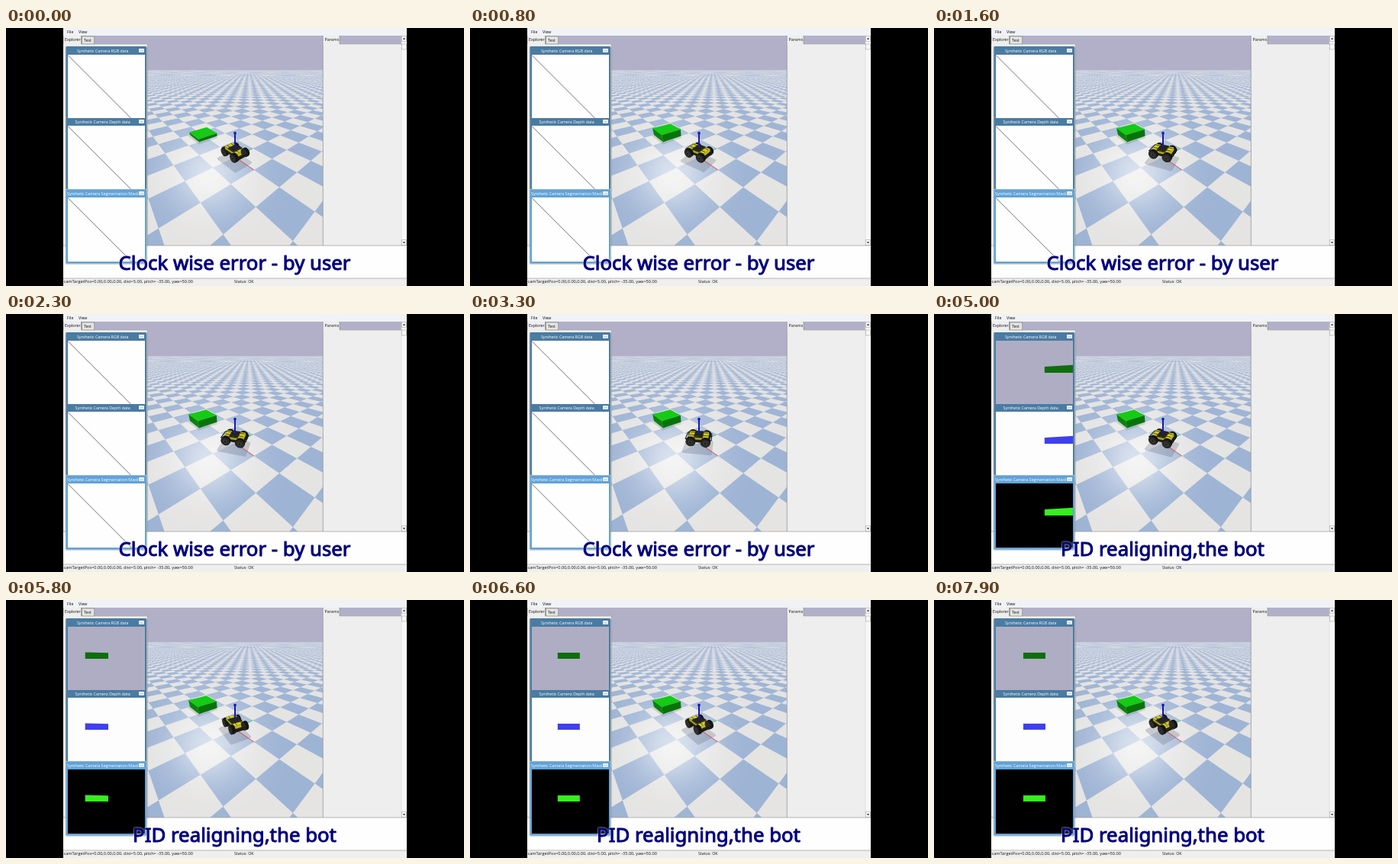
Animation, 600 px wide and 338 px high, one loop 8 s. Source, as an HTML page with a canvas:

```html
<!DOCTYPE html>
<html lang="en">
<head>
<meta charset="utf-8">
<title>Robot alignment simulation</title>
<style>
html, body { margin: 0; width: 100%; height: 100%; overflow: hidden; background: #000; }
canvas, svg { position: absolute; left: 0; top: 0; width: 600px; height: 338px; display: block; }
text { font: 5.3px "Open Sans", sans-serif; fill: #111; white-space: pre; }
.title { fill: #fff; text-anchor: middle; }
.caption { font: 400 25.8px "Noto Sans", sans-serif; fill: #00007c; text-anchor: middle;
  stroke: #00007c; stroke-width: 1px; stroke-linejoin: round; filter: drop-shadow(0 0 .8px #fff); }
</style>
</head>
<body>
<canvas id="floor" width="600" height="338"></canvas>
<svg viewBox="0 0 600 338">
  <g id="scene"></g>
  <g id="chrome"></g>
  <g id="views"></g>
  <text id="caption" class="caption" x="299.5" y="316.5"></text>
</svg>
<script>
const LOOP = 8000, STEP = 100, VIEWS_ON = 3500;
const rad = deg => deg * Math.PI / 180;
const byId = id => document.getElementById(id);

// Orbit camera around the world origin, z up.
const FOCAL = 169, CX = 300, CY = 169, DIST = 5;
const cosP = Math.cos(rad(35)), sinP = Math.sin(rad(35));
const cosY = Math.cos(rad(50)), sinY = Math.sin(rad(50));
const EYE = [sinY * cosP * DIST, -cosY * cosP * DIST, sinP * DIST];

function project([x, y, z]) {
  const right = x * cosY + y * sinY, ahead = y * cosY - x * sinY;
  const depth = DIST + ahead * cosP - z * sinP;
  const up = ahead * sinP + z * cosP;
  return [CX + FOCAL * right / depth, CY - FOCAL * up / depth, depth];
}

// ---------- static checkered floor ----------
const SKY = [178, 176, 200], HAZE = [205, 212, 226], BLUE = [157, 179, 212], WHITE = [229, 228, 227];

function floorColor(px, py) {
  const a = (px - CX) / FOCAL, b = (CY - py) / FOCAL;
  const fall = sinP - b * cosP;
  if (fall <= 0.022) return SKY;
  const t = EYE[2] / fall, ahead = t * (cosP + b * sinP), right = t * a;
  const x = EYE[0] + right * cosY - ahead * sinY;
  const y = EYE[1] + right * sinY + ahead * cosY;
  const base = (Math.floor(x) + Math.floor(y)) & 1 ? BLUE : WHITE;
  const fog = Math.min(1, t / 150);
  const shine = .6 * Math.exp(-((px - 266) ** 2 + (py - 190) ** 2) / 2600);
  return base.map((c, i) => {
    const hazy = c + (HAZE[i] - c) * fog;
    return hazy + (255 - hazy) * shine;
  });
}

function paintFloor() {
  const ctx = byId("floor").getContext("2d");
  const x0 = 185, y0 = 10, w = 230, h = 275, n = 4;
  const img = ctx.createImageData(w, h);
  for (let y = 0, k = 0; y < h; y++) for (let x = 0; x < w; x++, k += 4) {
    const sum = [0, 0, 0];
    for (let s = 0; s < n * n; s++) {
      const c = floorColor(x0 + x + (s % n + .5) / n, y0 + y + ((s / n | 0) + .5) / n);
      for (let i = 0; i < 3; i++) sum[i] += c[i];
    }
    for (let i = 0; i < 3; i++) img.data[k + i] = sum[i] / (n * n);
    img.data[k + 3] = 255;
  }
  ctx.putImageData(img, x0, y0);
}

// ---------- svg helpers ----------
const fix = v => v.toFixed(2);
const poly = (pts, fill, extra = "") =>
  `<polygon points="${pts.map(p => fix(p[0]) + "," + fix(p[1])).join(" ")}" fill="${fill}" ${extra}/>`;
const rect = (x, y, w, h, fill, extra = "") =>
  `<rect x="${x}" y="${y}" width="${w}" height="${h}" fill="${fill}" ${extra}/>`;
const line = (a, b, color, width = .7) =>
  `<line x1="${fix(a[0])}" y1="${fix(a[1])}" x2="${fix(b[0])}" y2="${fix(b[1])}" stroke="${color}" stroke-width="${width}"/>`;
const label = (x, y, s, cls = "", extra = "") => `<text x="${x}" y="${y}" class="${cls}" ${extra}>${s}</text>`;

// Box with its camera-facing sides; colors are [x sides, y sides, top].
function box([x0, x1], [y0, y1], [z0, z1], colors, place = p => p) {
  const faces = [
    [[x1, y0, z0], [x1, y1, z0], [x1, y1, z1], [x1, y0, z1], 0],
    [[x0, y1, z0], [x0, y0, z0], [x0, y0, z1], [x0, y1, z1], 0],
    [[x0, y0, z0], [x1, y0, z0], [x1, y0, z1], [x0, y0, z1], 1],
    [[x1, y1, z0], [x0, y1, z0], [x0, y1, z1], [x1, y1, z1], 1],
    [[x0, y0, z1], [x1, y0, z1], [x1, y1, z1], [x0, y1, z1], 2]
  ];
  return faces.map(f => {
    const p = f.slice(0, 4).map(v => project(place(v)));
    const turn = (p[1][0] - p[0][0]) * (p[2][1] - p[0][1]) - (p[1][1] - p[0][1]) * (p[2][0] - p[0][0]);
    return turn < 0 ? poly(p, colors[f[4]]) : "";
  }).join("");
}

// ---------- motion ----------
const HEADING = [[0, 1], [1600, 27], [3300, 42], [3500, 41], [4300, 38], [5000, 27],
  [6050, -18], [6600, -2], [7100, 0], [7900, 0], [8000, 0]];

function heading(t) {
  const i = Math.max(1, HEADING.findIndex(k => k[0] > t));
  const [t0, a] = HEADING[i - 1], [t1, b] = HEADING[i];
  const u = (t - t0) / (t1 - t0);
  const eased = t >= 5000 ? u * u * (3 - 2 * u) : u;
  return rad(a + (b - a) * eased);
}

// ---------- scene ----------
const AXLE = .23, WHEEL_R = .17;

function wheel(x, y, place) {
  const side = Math.sign(y), disc = (offset, r, fill) => {
    const pts = [];
    for (let i = 0; i < 16; i++) {
      const q = i * Math.PI / 8;
      pts.push(project(place([x + r * Math.cos(q), y + offset, AXLE + r * Math.sin(q)])));
    }
    return poly(pts, fill);
  };
  const depth = project(place([x, y, AXLE]))[2];
  const toEye = project(place([x, y + .1, AXLE]))[2] < depth ? 1 : -1;
  let out = "";
  for (let i = -3; i <= 3; i++) out += disc(toEye * i * .022, WHEEL_R, i < 3 ? "#161616" : "#282826");
  if (toEye === side) out += disc(toEye * .068, .085, "#3c3c38") + disc(toEye * .07, .04, "#181818");
  return { depth, out };
}

function robot(angle) {
  const c = Math.cos(angle), s = Math.sin(angle);
  const place = ([x, y, z]) => [x * c - y * s, x * s + y * c, z];
  const at = (x, y, z) => project(place([x, y, z]));
  const wheels = [[-.27, -.27], [-.27, .27], [.27, -.27], [.27, .27]]
    .map(([x, y]) => wheel(x, y, place)).sort((a, b) => b.depth - a.depth);
  const bumper = x => {
    const e = Math.sign(x) * .12;
    const pts = [at(x - e, -.25, .36), at(x, -.24, .3), at(x, .24, .3), at(x - e, .25, .36)];
    return pts.slice(1).map((p, i) => line(pts[i], p, "#16161a", 1.1)).join("");
  };
  const shade = [[-.48, -.36], [.48, -.36], [.48, .36], [-.48, .36]].map(([x, y]) => {
    const p = place([x, y, 0]);
    return project([p[0] + .16, p[1] - .17, 0]);
  });
  const near = wheels.filter(w => w.depth < project([0, 0, AXLE])[2]);
  const far = wheels.filter(w => !near.includes(w));
  const draw = list => list.map(w => w.out).join("");
  return poly(shade, "#5a6070", 'opacity=".26" stroke="#5a6070" stroke-width="4" stroke-linejoin="round"')
    + line(project([0, 0, 0]), project([1, 0, 0]), "#d0404a", .9)
    + line(project([0, 0, 0]), project([0, 1, 0]), "#30c878", .9)
    + draw(far)
    + bumper(-.47)
    + box([-.42, .42], [-.2, .2], [.17, .28], ["#20200f", "#1c1c14", "#15150f"], place)
    + box([-.36, .36], [-.2, .2], [.28, .4], ["#bdb520", "#a8a01c", "#d2cc26"], place)
    + box([-.16, .16], [-.21, .21], [.38, .42], ["#0f0f0c", "#15150f", "#22221c"], place)
    + line(at(-.34, -.1, .41), at(.34, -.1, .41), "#2c2c14", .8)
    + line(at(-.34, .1, .41), at(.34, .1, .41), "#2c2c14", .8)
    + draw(near)
    + bumper(.47);
}

function scene(t) {
  const rise = Math.min(1, t / 600), height = .15 + .21 * rise;
  const mastTop = project([0, 0, 1]);
  const shade = [[-3, -.62], [-1.8, -.62], [-1.8, .42], [-3, .42]].map(([x, y]) => project([x, y, 0]));
  return poly(shade, "#5a6070", 'opacity=".22"')
    + box([-3, -2], [-.5, .5], [0, height], ["#087408", "#0a820e", "#16ca16"])
    + robot(heading(t))
    + line(project([0, 0, .4]), mastTop, "#1818a8", 2)
    + `<circle cx="${fix(mastTop[0])}" cy="${fix(mastTop[1])}" r="1.9" fill="#2020b4"/>`;
}

// ---------- camera windows ----------
const WINDOWS = [
  { top: 35, h: 83, name: "Synthetic Camera RGB data", bg: "#afadc4", box: "#0e6e0e", bar: "#4a7ba2" },
  { top: 128, h: 83, name: "Synthetic Camera Depth data", bg: "#fdfdfd", box: "#3f3ff0", bar: "#4a7ba2" },
  { top: 222, h: 84, name: "Synthetic Camera Segmentation Mask", bg: "#000", box: "#35f01c", bar: "#60a3d8" }
];

// Front side of the green block as seen from the robot.
function blockView(angle, top) {
  const c = Math.cos(angle), s = Math.sin(angle), f = 58;
  const corner = (side, z) => {
    const depth = 2 * c - side * s, across = 2 * s + side * c;
    return [131.5 + f * across / depth, top + 41.5 - f * z / depth];
  };
  return [corner(-.5, .26), corner(.5, .26), corner(.5, -.015), corner(-.5, -.015)];
}

function views(t) {
  const live = t >= VIEWS_ON;
  return WINDOWS.map((w, i) => rect(81, w.top, 101, w.h, live ? w.bg : "#fefefe")
    + (live ? poly(blockView(heading(t), w.top), w.box, `clip-path="url(#clip${i})"`)
            : line([81, w.top + .5], [80.5 + w.h, w.top + w.h], "#333", .7))).join("");
}

function chrome() {
  const grey = "#eeeeee", edge = "#a8a8a8", sky = "#b2b0c8";
  let out = rect(75, 0, 450, 10, "#f0f2f5") + label(80, 6.7, "File") + label(95, 6.7, "View")
    + rect(75, 10, 110, 12, sky) + rect(415, 10, 110, 12, sky)
    + rect(75, 21, 110, 264, grey) + rect(415, 21, 110, 264, grey)
    + line([185, 21], [185, 285], edge) + line([415.3, 10], [415.3, 285], "#888")
    + line([116, 21], [185, 21], edge) + line([437, 21], [518, 21], edge)
    + rect(75.5, 10, 23, 12, grey) + rect(99.3, 11, 16.5, 10, "#e4e4e4", 'stroke="#777" stroke-width=".6"')
    + line([98.6, 10], [98.6, 21], "#888") + line([437, 10], [437, 21], "#888")
    + rect(415.6, 10, 21, 12, grey)
    + label(77, 17.4, "Explorer") + label(102, 17.8, "Test") + label(417.6, 17.4, "Params");
  // Scrollbar
  out += rect(518, 10, 7, 275, "#f8f8f8") + line([518, 10], [518, 285], "#ccc", .5);
  for (const [y, h] of [[10.5, 7], [21, 7], [277.5, 7]])
    out += rect(518.5, y, 6, h, "#f6f6f6", 'stroke="#999" stroke-width=".5"');
  out += poly([[520, 15], [523, 15], [521.5, 12.6]], "#333") + poly([[520, 280], [523, 280], [521.5, 282.4]], "#333");
  // Output and status areas
  out += rect(75, 285, 450, 43, "#fefefe") + line([75, 285], [525, 285], "#999")
    + rect(75, 328, 450, 10, "#efefef") + line([75, 328], [525, 328], "#999")
    + label(75.5, 334.3, "camTargetPos=0.00,0.00,0.00, dist=5.00, pitch= -35.00, yaw=50.00", "", 'style="font-size:5.6px"')
    + label(299, 334.3, "Status: OK");
  // Window frames
  out += rect(77.5, 25, 108, 285, "#000", 'opacity=".16" rx="2"');
  WINDOWS.forEach((w, i) => {
    const bar = i ? 10.5 : 11;
    out += rect(78.5, w.top - bar, 105.5, w.h + bar + (i === 2 ? 2.5 : 0), w.bar, 'rx="1.2"')
      + label(126.7, w.top - 3.3, w.name, "title")
      + rect(174, w.top - 8, 7, 5, "#e9f0f6", 'rx=".8"')
      + line([175.5, w.top - 5], [179.5, w.top - 5], "#9ab", .7)
      + `<clipPath id="clip${i}">${rect(81, w.top, 101, w.h, "#000")}</clipPath>`;
  });
  return out;
}

// ---------- playback ----------
let shown = -1;
function render(time) {
  const t = Math.floor(time % LOOP / STEP) * STEP;
  if (t !== shown) {
    shown = t;
    byId("scene").innerHTML = scene(t);
    byId("views").innerHTML = views(t);
    byId("caption").textContent = t < VIEWS_ON ? "Clock wise error - by user" : "PID realigning,the bot";
  }
}

paintFloor();
byId("chrome").innerHTML = chrome();
const start = performance.now();
function tick() {
  render(performance.now() - start);
  requestAnimationFrame(tick);
}
tick();
</script>
</body>
</html>
```
